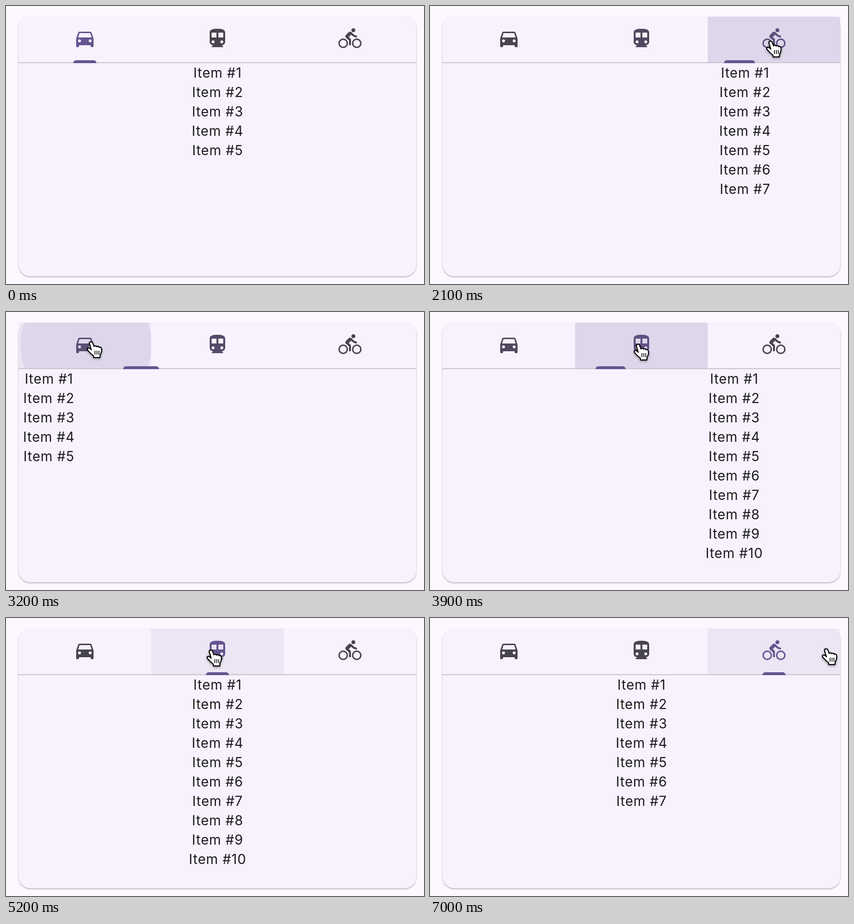
An HTML page with a canvas that plays this animation: 864 by 574 pixels, repeating every 7.53 s.

```html
<!DOCTYPE html>
<html lang="en">
<head>
<meta charset="utf-8">
<title>Tabs</title>
<style>
  html, body { margin: 0; width: 864px; height: 574px; overflow: hidden; background: #fdf8ff; }
  canvas { display: block; }
</style>
</head>
<body>
<canvas id="stage" width="864" height="574"></canvas>
<script>
const ctx = document.getElementById('stage').getContext('2d');
const LOOP = 7530, STEP = 100;
const LEFT = 26, TOP = 22, WIDTH = 822, TAB = WIDTH / 3, BAR = 94;
const PRIMARY = [102, 84, 143], DARK = [73, 69, 78], INK = [29, 27, 32];
const COUNTS = [5, 10, 7];

// press time, release time, tab
const CLICKS = [
  [1075, 1171, 1], [1910, 1967, 2], [2510, 2583, 1],
  [3020, 3100, 0], [3700, 3760, 1], [4340, 4417, 2],
  [4640, 4700, 1], [5525, 5600, 0], [6110, 6170, 2]
].map(([press, release, tab]) => ({ press, release, tab }));

// time and fingertip position
const MOVES = [
  [700, 446, 112], [1000, 432, 70], [1470, 432, 70], [1780, 704, 72],
  [2200, 704, 72], [2480, 450, 66], [2700, 440, 66], [2960, 176, 61],
  [3320, 176, 61], [3620, 430, 66], [3960, 430, 66], [4230, 704, 66],
  [4450, 704, 66], [4600, 540, 64], [4900, 440, 66], [5150, 440, 66],
  [5480, 176, 64], [5650, 176, 64], [5800, 681, 64], [5880, 705, 66],
  [6350, 705, 66], [6680, 819, 63]
];

const ring = (x, y, r) => `M${x - r} ${y}a${r} ${r} 0 1 0 ${2 * r} 0a${r} ${r} 0 1 0 ${-2 * r} 0z`;
const wheel = x => ring(x, 17, 5) + ring(x, 17, 3.5);

const ICONS = [
  'M18.92 6.01C18.72 5.42 18.16 5 17.5 5h-11c-.66 0-1.21.42-1.42 1.01L3 12v8c0 .55.45 1 1 1h1c.55 0 1-.45 1-1v-1h12v1c0 .55.45 1 1 1h1c.55 0 1-.45 1-1v-8z' +
    'M5 11l1.5-4.5h11L19 11z' + ring(6.5, 14.5, 1.5) + ring(17.5, 14.5, 1.5),
  'M12 2c-4.42 0-8 .5-8 4v9.5C4 17.43 5.57 19 7.5 19L6 20.5v.5h12v-.5L16.5 19c1.93 0 3.5-1.57 3.5-3.5V6c0-3.5-3.58-4-8-4z' +
    'M6 6h5v5H6zM13 6h5v5h-5z' + ring(7.5, 15.5, 1.5) + ring(16.5, 15.5, 1.5),
  'M10.8 10.5l2.4-2.4.8.8c1.3 1.3 3 2.1 5.1 2.1V9c-1.5 0-2.7-.6-3.6-1.5l-1.9-1.9c-.5-.4-1-.6-1.6-.6s-1.1.2-1.4.6L7.8 8.4c-.4.4-.6.9-.6 1.4 0 .6.2 1.1.6 1.4L11 14v5h2v-6.2z' +
    ring(15.5, 3.5, 2) + wheel(5) + wheel(19)
].map(d => new Path2D(d));

const HAND = new Path2D(
  'M-3.4 2.6C-3.4-.8 1.8-1.2 2.8 1.4L6 9.5C7 7.6 10.6 7.6 11.3 10C12.5 8.3 16 8.8 16.4 11.2' +
  'C18 10 20.8 11 21.2 13.5C22.4 19 20.5 23 18.5 26.5L18 32H5.5L5 28.5C2 26-2.5 22-5 19' +
  'C-7 16.8-8.5 15.5-7.8 13.8C-6.8 11.9-3.8 12.2-1.8 14.2L.6 16.4z');
const CREASES = new Path2D('M8 18.5v7M12 18.5v7M16 18.5v7');

const clamp = v => Math.min(1, Math.max(0, v));
const lerp = (a, b, p) => a + (b - a) * p;
const rgb = (c, a = 1) => `rgba(${c.join()},${a})`;
const center = i => LEFT + TAB * (i + 0.5);

// cubic-bezier(.25, .1, .25, 1), solved by bisection
function ease(x) {
  if (x <= 0 || x >= 1) return clamp(x);
  const curve = (a, b, s) => 3 * (1 - s) * s * ((1 - s) * a + s * b) + s ** 3;
  let lo = 0, hi = 1;
  for (let i = 0; i < 24; i++) {
    const mid = (lo + hi) / 2;
    if (curve(0.25, 0.25, mid) < x) lo = mid; else hi = mid;
  }
  return curve(0.1, 1, lo);
}

function cursorAt(t) {
  if (t < MOVES[0][0]) return null;
  const i = MOVES.findIndex(m => m[0] > t);
  if (i < 0) return MOVES[MOVES.length - 1].slice(1);
  const [t0, x0, y0] = MOVES[i - 1], [t1, x1, y1] = MOVES[i];
  const k = (t - t0) / (t1 - t0), p = k * k * (3 - 2 * k);
  return [lerp(x0, x1, p), lerp(y0, y1, p)];
}

function pageAt(t) {
  let from = 0, to = 0, p = 1;
  for (const c of CLICKS) {
    if (t < c.release) break;
    from = to;
    to = c.tab;
    p = ease((t - c.release) / 300);
  }
  return { from, to, p };
}

function drawCard() {
  ctx.fillStyle = '#fdf8ff';
  ctx.fillRect(0, 0, 864, 574);
  ctx.save();
  ctx.shadowColor = 'rgba(0,0,0,.32)';
  ctx.shadowBlur = 3;
  ctx.shadowOffsetY = 1.5;
  ctx.fillStyle = '#f7f2fd';
  ctx.beginPath();
  ctx.roundRect(LEFT, TOP, WIDTH, 536, 24);
  ctx.fill();
  ctx.restore();
}

function drawHover(t, selected) {
  const at = cursorAt(t - 70);
  if (!at) return;
  const tab = Math.floor((at[0] - LEFT) / TAB);
  ctx.fillStyle = rgb(tab === selected ? PRIMARY : INK, 0.08);
  ctx.fillRect(LEFT + TAB * tab, TOP, TAB, BAR);
}

function drawRipple(t, { press, release, tab }) {
  if (t < press || t > release + 375) return;
  const held = (Math.min(t, release) - press) / 1000;
  const grow = ease(clamp(held + Math.max(0, t - release) / 225));
  const alpha = clamp((t - press) / 75) * (1 - clamp((t - release - 225) / 150));
  const full = Math.hypot(TAB, BAR) / 2;
  const [x, y] = cursorAt(press);
  ctx.save();
  ctx.beginPath();
  ctx.rect(LEFT + TAB * tab, TOP, TAB, BAR);
  ctx.clip();
  ctx.beginPath();
  ctx.arc(lerp(x, center(tab), grow), lerp(y, TOP + BAR / 2, grow), lerp(0.3 * full, full + 10, grow), 0, 7);
  ctx.fillStyle = rgb(PRIMARY, 0.1 * alpha);
  ctx.fill();
  ctx.restore();
}

function drawIcon(i, active) {
  ctx.save();
  ctx.translate(center(i) - 24, 43);
  ctx.scale(2, 2);
  ctx.fillStyle = rgb(DARK.map((v, k) => Math.round(lerp(v, PRIMARY[k], active))));
  ctx.fill(ICONS[i], 'evenodd');
  ctx.restore();
}

function drawIndicator({ from, to, p }) {
  ctx.fillStyle = '#cac4cf';
  ctx.fillRect(LEFT, 116, WIDTH, 2);
  const w = 48 + 62 * Math.min(p, 1 - p);
  ctx.fillStyle = rgb(PRIMARY);
  ctx.beginPath();
  ctx.roundRect(lerp(center(from), center(to), p) - w / 2, 112, w, 6, [6, 6, 0, 0]);
  ctx.fill();
}

function drawList(page, shift) {
  for (let i = 1; i <= COUNTS[page]; i++) {
    ctx.fillText('Item #' + i, 437.4 + shift, 108 + 40 * i);
  }
}

function drawPages({ from, to, p }) {
  ctx.save();
  ctx.beginPath();
  ctx.rect(LEFT, 118, WIDTH, 440);
  ctx.clip();
  ctx.font = '400 28px Inter, Roboto, sans-serif';
  ctx.letterSpacing = '0.8px';
  ctx.textAlign = 'center';
  ctx.fillStyle = rgb(INK);
  const dir = Math.sign(to - from);
  if (p < 1) drawList(from, -dir * p * WIDTH);
  drawList(to, dir * (1 - p) * WIDTH);
  ctx.restore();
}

function drawHand(at) {
  if (!at) return;
  ctx.save();
  ctx.translate(at[0], at[1] + 1);
  ctx.lineJoin = ctx.lineCap = 'round';
  ctx.strokeStyle = '#000';
  ctx.save();
  ctx.shadowColor = 'rgba(0,0,0,.45)';
  ctx.shadowBlur = 4;
  ctx.shadowOffsetY = 2;
  ctx.lineWidth = 2.6;
  ctx.stroke(HAND);
  ctx.restore();
  ctx.fillStyle = '#fff';
  ctx.fill(HAND);
  ctx.lineWidth = 1.8;
  ctx.stroke(HAND);
  ctx.lineWidth = 1.6;
  ctx.stroke(CREASES);
  ctx.restore();
}

function draw(t) {
  const page = pageAt(t);
  drawCard();
  drawHover(t, page.to);
  CLICKS.forEach(c => drawRipple(t, c));
  ICONS.forEach((_, i) => drawIcon(i, i === page.to ? page.p : i === page.from ? 1 - page.p : 0));
  drawIndicator(page);
  drawPages(page);
  drawHand(cursorAt(t));
}

const start = performance.now();
function tick() {
  const t = (performance.now() - start) % LOOP;
  // the picture advances ten times a second
  draw(Math.floor(t / STEP) * STEP);
  requestAnimationFrame(tick);
}
tick();
</script>
</body>
</html>
```
